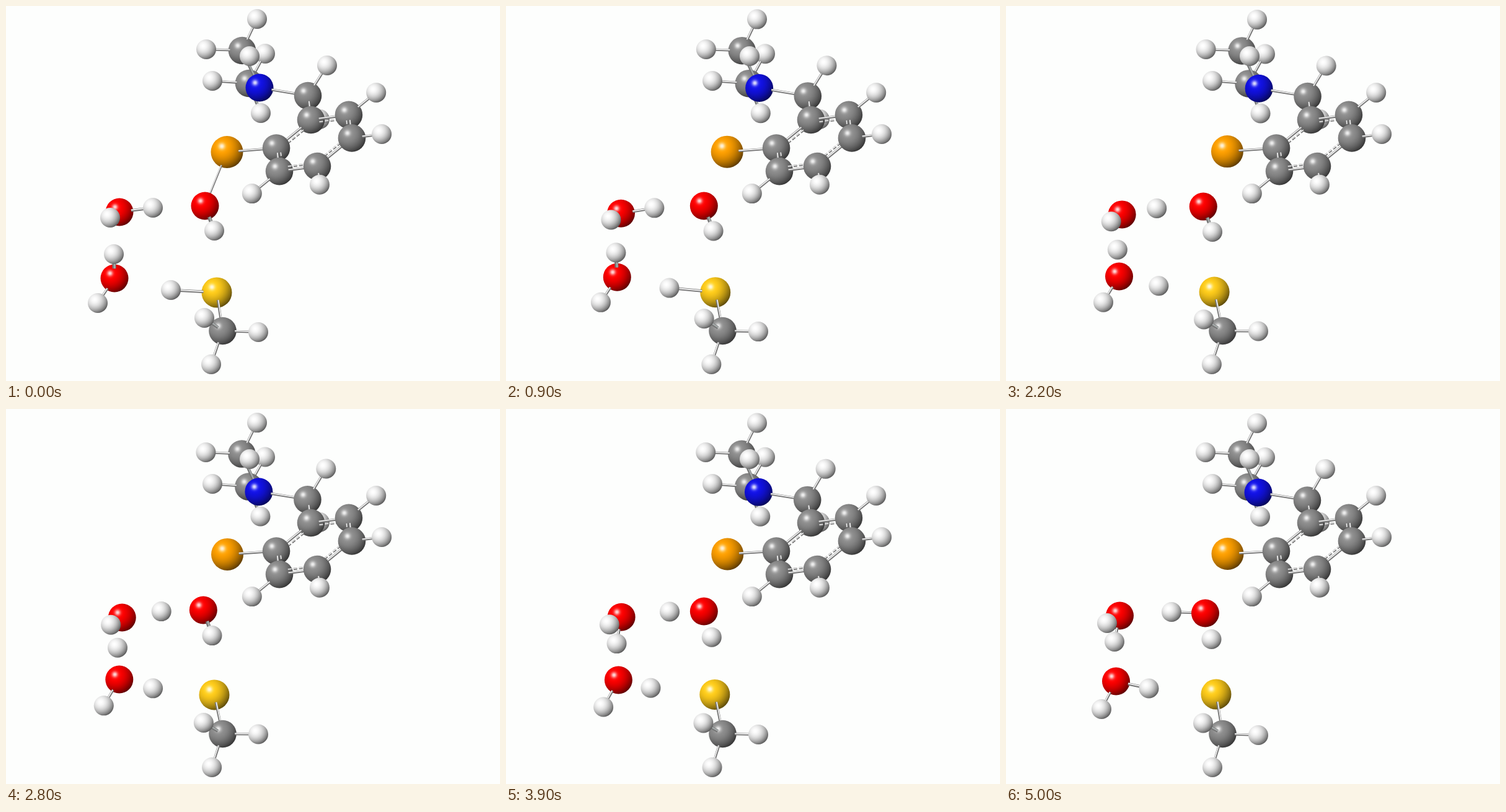
Animation, 797 px wide and 606 px high, one loop 5.1 s. Source, as an HTML page:

```html
<!DOCTYPE html>
<html lang="en">
<head>
<meta charset="utf-8">
<title>Proton relay</title>
<style>
html, body { margin: 0; width: 100%; height: 100%; overflow: hidden; background: #fdfefd; }
svg { display: block; }
</style>
</head>
<body>
<svg id="stage" width="797" height="606" viewBox="0 0 797 606"><defs id="defs"></defs></svg>
<script>
const LOOP = 5100, STEP = 100;
const stage = document.getElementById('stage');
const defs = document.getElementById('defs');

const ELEMENTS = {
  H: { r: 16, rgb: [240, 240, 240] },
  C: { r: 22.3, rgb: [142, 142, 142] },
  N: { r: 22.5, rgb: [18, 18, 232] },
  O: { r: 22.5, rgb: [255, 0, 0] },
  S: { r: 24.5, rgb: [255, 204, 26] },
  Se: { r: 26, rgb: [255, 160, 0] }
};

function el(name, attrs, parent) {
  const node = document.createElementNS('http://www.w3.org/2000/svg', name);
  for (const key in attrs) node.setAttribute(key, attrs[key]);
  return parent.appendChild(node);
}

// Light from the upper left: a small white glint, then a fall-off to the lower right
function shade(rgb, s) {
  const light = 1.05 - 0.72 * s * s;
  const glint = 0.9 * Math.exp(-((s / 0.13) ** 2));
  const mix = rgb.map(c => {
    const lit = Math.min(255, c * light);
    return Math.round(lit + (255 - lit) * glint);
  });
  return `rgb(${mix})`;
}

for (const [name, { rgb }] of Object.entries(ELEMENTS)) {
  const grad = el('radialGradient', { id: 'ball' + name, cx: 0.34, cy: 0.32, r: 0.75 }, defs);
  for (let i = 0; i <= 16; i++) {
    el('stop', { offset: i / 16, 'stop-color': shade(rgb, i / 16) }, grad);
  }
}

// A number, or [start, end, bow, hop, hop centre] over u = 0..1:
// a straight drift, a parabolic detour and a soft jump
function path(v, u) {
  if (!Array.isArray(v)) return v;
  const [start, end, bow = 0, hop = 0, mid = 0.5] = v;
  const jump = hop / (1 + Math.exp((mid - u) / 0.04));
  return start + (end - start - hop) * u + bow * 4 * u * (1 - u) + jump;
}

const atoms = {}, bonds = [];

function atom(id, x, y) {
  const kind = id.replace(/\d+/, ''), r = ELEMENTS[kind].r;
  const node = el('circle', { r, fill: `url(#ball${kind})` }, stage);
  atoms[id] = { node, r, x, y, px: 0, py: 0 };
}

// The ring is a tilted hexagon; out = 1 for carbons, more for what hangs on them
const RING = { x: 497, y: 221.5 };
function ringAtom(id, corner, out = 1) {
  const c = out * Math.cos(corner * Math.PI / 3), s = out * Math.sin(corner * Math.PI / 3);
  atom(id, RING.x - 5 * c + 67.5 * s, RING.y - 37.5 * c - 31 * s);
}

// far atom, near atom; k is where the stick leaves the far ball
function bond(far, near, { k = 0.88, w = 4, from = 0, to = LOOP, dark = false, ring = false } = {}) {
  const g = el('g', {}, stage);
  const stick = (width, dash) => [['#757575', 1, 0], [dark ? '#a5aaaa' : '#f0f0f0', 0.45, 0.7]]
    .map(([stroke, part, lift]) => ({
      lift,
      line: el('line', { stroke, 'stroke-width': width * part, 'stroke-dasharray': dash }, g)
    }));
  bonds.push({ g, far, near, k, from, to, outer: stick(w, 'none'), inner: ring ? stick(3.4, '6 3') : [] });
}

function placeBond(b, t) {
  const on = t >= b.from && t < b.to;
  b.g.setAttribute('display', on ? 'inline' : 'none');
  if (!on) return;
  const p = atoms[b.far], q = atoms[b.near];
  const dx = q.px - p.px, dy = q.py - p.py;
  const up = dx < 0 ? 1 : -1;
  const side = Math.sign(dx * (RING.y - p.py) - dy * (RING.x - p.px));
  b.g.setAttribute('transform',
    `translate(${p.px} ${p.py}) rotate(${Math.atan2(dy, dx) * 180 / Math.PI})`);
  const put = (sticks, shift) => sticks.forEach(({ line, lift }) => {
    const y = shift + up * lift;
    line.setAttribute('x1', p.r * b.k);
    line.setAttribute('x2', Math.hypot(dx, dy));
    line.setAttribute('y1', y);
    line.setAttribute('y2', y);
  });
  put(b.outer, 0);
  put(b.inner, side * 5.5);
}

// Built from back to front: amine arm
atom('H4', 418, [77, 78]);
bond('H4', 'C2');
atom('C2', [392, 391], [125, 126]);
atom('C1', [381, 380], [72, 73]);
bond('C1', 'N', { w: 5, dark: true });
bond('C1', 'H2');
bond('C1', 'H1');
atom('H3', 393, 81);
atom('H2', [323, 322], 70);
atom('H1', 405, [21, 23]);
bond('C2', 'H5');
atom('H5', 333, 121);
bond('C2', 'H6', { w: 5, dark: true });
atom('N', [409, 407], [132, 135]);
atom('H6', [411, 410], [173, 174]);
atom('H8', 506, 183);
bond('N', 'C3');
atom('C3', [487, 486], [145, 147.5]);
bond('C3', 'H7');
atom('H7', [518, 515], [96, 97]);

// Aromatic ring
bond('C3', 'C4', { k: 0.4 });
ringAtom('C4', 0);
bond('C4', 'C5', { k: 0.58, ring: true });
bond('C4', 'C9', { ring: true });
ringAtom('C5', 1);
bond('C5', 'H9');
ringAtom('H9', 1, 1.79);
bond('C5', 'C6', { k: 0.38, ring: true });
bond('C7', 'C6', { ring: true });
ringAtom('C6', 2);
bond('C6', 'H10', { k: 0.76 });
ringAtom('H10', 2, 1.79);
atom('Se', [356.5, 357.5], [236, 234]);
bond('Se', 'C9', { k: 0.72 });
ringAtom('C9', 5);
bond('C9', 'C8', { k: 0.35, ring: true });
ringAtom('C8', 4);
bond('C8', 'C7', { k: 0.66, ring: true });
bond('C8', 'H12');
ringAtom('C7', 3);
bond('C7', 'H11', { k: 0.5 });
ringAtom('H11', 3, 1.79);
ringAtom('H12', 4, 1.79);

// Hydroxide and waters
bond('Se', 'O1', { w: 3, to: 400 });
bond('H15', 'O1', { from: 4700 });
atom('O1', [321, 321.5, -3], [323, 330, -2]);
bond('O1', 'H13', { k: 0.85, w: 6, dark: true, to: 3900 });
atom('H13', [336, 331.5, -1], [363, 372, -2]);
atom('O2', [183, 183.5, 4], [333, 334, 3.5]);
bond('O2', 'H15', { k: 0.85, w: 4.5, to: 1200 });
atom('H15', [237, 267, 0, 17, 0.58], [326, 328]);
atom('O3', [175, 177.5, 6.5], [440, 440, -3]);
bond('O3', 'H16', { k: 0.7, w: 6, dark: true, to: 1900 });
bond('O2', 'H16', { w: 4.5, from: 3900 });
atom('H16', [174, 175, 5.5], [401, 376, 0, -11, 0.53]);
atom('H14', [168, 163, 4], [342, 346, 4.5]);
bond('O3', 'H17');
atom('H17', [148, 154, 6.5], [480, 485, -3.5]);

// Thiol
atom('S', [340, 339, -3.5], [463, 461]);
bond('S', 'H18', { w: 4.5, to: 1300 });
bond('O3', 'H18', { w: 4.5, from: 4700 });
atom('H18', [266, 230.5, 0, -22, 0.42], [459, 451.5, -3.5]);
bond('S', 'C10', { k: 0.5 });
atom('C10', 349.5, 525);
bond('C10', 'H19', { k: 0.4, w: 5, dark: true });
bond('C10', 'H20');
bond('C10', 'H21');
atom('H19', [320, 318], [504, 507.5, 1]);
atom('H20', 407, [527, 527, -1.5]);
atom('H21', [331, 333], 579);

function draw(ms) {
  const t = Math.floor((ms % LOOP) / STEP) * STEP;
  const u = t / (LOOP - STEP);
  for (const a of Object.values(atoms)) {
    a.px = path(a.x, u);
    a.py = path(a.y, u);
    a.node.setAttribute('cx', a.px);
    a.node.setAttribute('cy', a.py);
  }
  for (const b of bonds) placeBond(b, t);
}

const began = performance.now();
function tick() {
  draw(performance.now() - began);
  requestAnimationFrame(tick);
}
tick();
</script>
</body>
</html>
```
